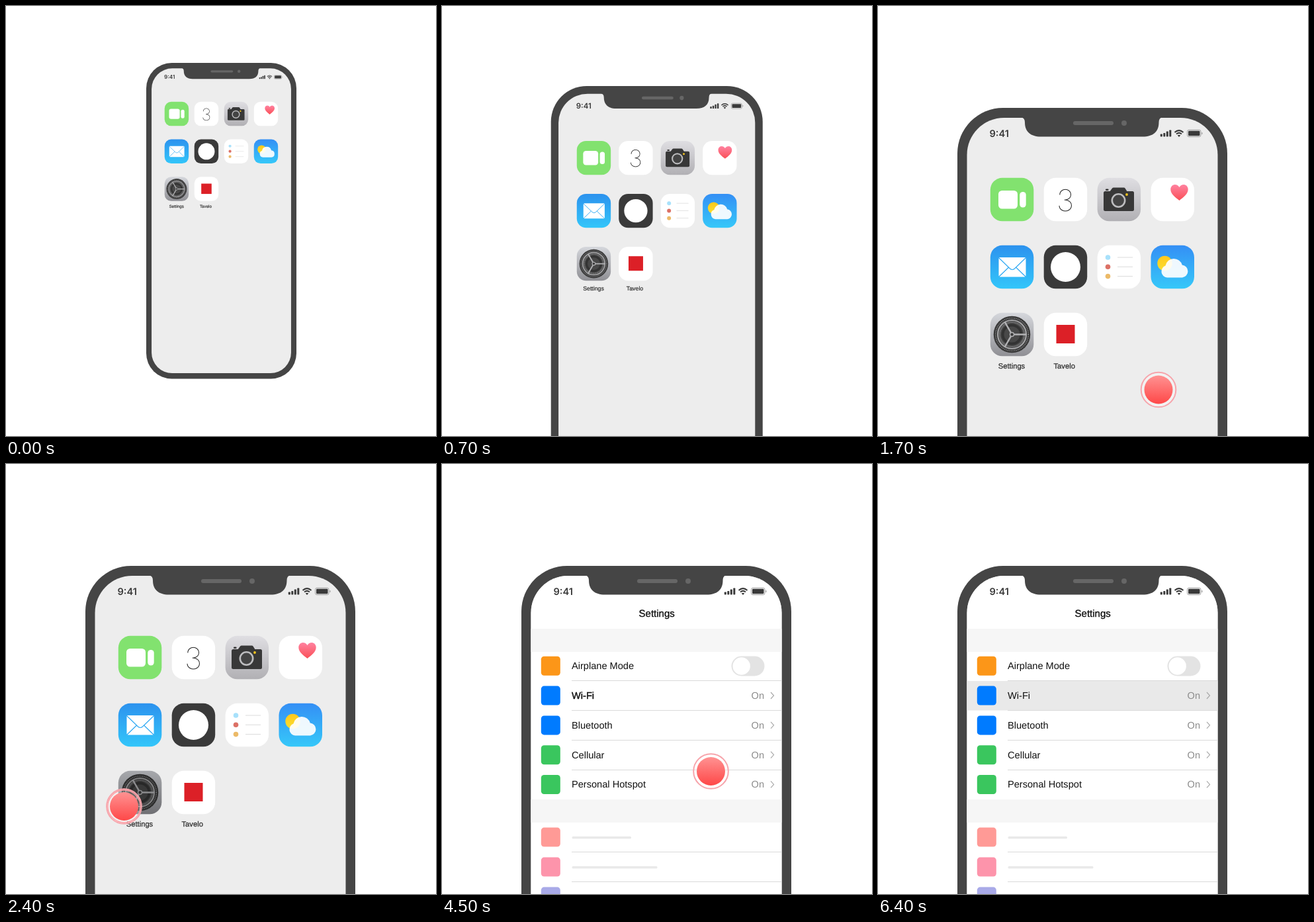
An HTML page that plays this animation: 650x650 px, repeating every 8000 ms.

```html
<!DOCTYPE html>
<html lang="en">
<head>
<meta charset="utf-8">
<title>Phone settings walkthrough</title>
<style>
html, body { margin: 0; width: 100%; height: 100%; overflow: hidden; background: #fff; }
svg { display: block; width: 100vw; height: 100vh; }
text { font-family: "Liberation Sans", Arial, sans-serif; text-rendering: geometricPrecision; }
.row { font-size: 14.6px; fill: #111; }
.on { font-size: 14.6px; fill: #8c8c8c; text-anchor: end; }
.label { font-size: 11.2px; fill: #333; stroke: #333; stroke-width: .3; text-anchor: middle; }
.title { font-size: 15px; fill: #111; stroke: #111; stroke-width: .35; text-anchor: middle; }
.clock { font: 600 14.6px Inter, sans-serif; fill: #3a3a3a; }
.three { font: 100 45px Inter, sans-serif; fill: #222; text-anchor: middle; }
</style>
</head>
<body>
<svg viewBox="0 0 650 650">
  <defs id="defs">
    <clipPath id="screen"><rect x="134.5" y="169" width="379" height="828" rx="56"/></clipPath>
  </defs>
  <g id="phone">
    <rect x="120" y="154" width="408" height="858" rx="69" fill="#454545"/>
    <g clip-path="url(#screen)">
      <rect x="134" y="168" width="380" height="830" fill="#ededed"/>
      <g id="home"></g>
      <g id="settings"></g>
    </g>
    <path fill="#454545" d="M216 168 Q222 169 222 176 C222 190 231 197.5 246 197.5 H400 C416 197.5 424.5 190 424.5 176 Q424.5 169 430 168Z"/>
    <rect x="295" y="174" width="61" height="6" rx="3" fill="#666"/>
    <circle cx="372" cy="177" r="4" fill="#666"/>
    <text class="clock" x="168.5" y="198">9:41</text>
    <g id="status" fill="#3a3a3a"></g>
  </g>
  <g id="touch">
    <circle id="ripple" fill="none" stroke="#ff8088" stroke-width="1.3"/>
    <circle id="ring" r="26.3" fill="#fff" fill-opacity=".25" stroke="#f7a4ab" stroke-width="2"/>
    <circle id="dot" r="21.5" fill="url(#red)"/>
  </g>
</svg>
<script>
const $ = id => document.getElementById(id);
const rect = (x, y, w, h, fill, r = 0) =>
  `<rect x="${x}" y="${y}" width="${w}" height="${h}" rx="${r}" fill="${fill}"/>`;
const circle = (x, y, r, fill, extra = "") =>
  `<circle cx="${x}" cy="${y}" r="${r}" fill="${fill}" ${extra}/>`;
const line = (d, stroke, width = 1, extra = "") =>
  `<path d="${d}" fill="none" stroke="${stroke}" stroke-width="${width}" ${extra}/>`;
const text = (x, y, cls, s, extra = "") =>
  `<text x="${x}" y="${y}" class="${cls}" ${extra}>${s}</text>`;

const gradients = {
  red: ["#ff9292", "#fe4848"],
  metal: ["#dfdee2", "#b1b0b4"],
  love: ["#ff82a0", "#fa4f56"],
  mail: ["#2c92ee", "#33c6fa"],
  sky: ["#348ff5", "#36c8f9"],
  sun: ["#ffc81c", "#fadf2f"],
  steel: ["#d5d7dc", "#8f8f94"]
};
for (const [id, [top, bottom]] of Object.entries(gradients))
  $("defs").innerHTML += `<linearGradient id="${id}" x2="0" y2="1">
    <stop stop-color="${top}"/><stop offset="1" stop-color="${bottom}"/></linearGradient>`;

// Home screen
const SIZE = 65.5;
const tile = (col, row, fill) => rect(169.8 + col * 80.9, 259.8 + row * 102, SIZE, SIZE, fill, 18);

function gear(x, y) {
  const spokes = [0, 120, 240].map(a => `<path d="M3 0H22" transform="rotate(${a})"/>`).join("");
  return `<g transform="translate(${x} ${y})">
    ${circle(0, 0, 27.8, "#383838")}
    ${circle(0, 0, 24.8, "none", 'stroke="#858587" stroke-width="1.6" stroke-dasharray="1.3 1.3"')}
    ${circle(0, 0, 21.5, "#4a4a4a", 'stroke="#a2a2a4" stroke-width="2.2"')}
    ${circle(0, 0, 18.5, "none", 'stroke="#8a8a8c" stroke-width="1.8" stroke-dasharray="1 1"')}
    ${circle(0, 0, 14, "#484848", 'stroke="#333" stroke-width="4"')}
    <g stroke="#b2b2b4" stroke-width="2.4">${spokes}</g>
    ${circle(0, 0, 3, "#3a3a3a", 'stroke="#b2b2b4" stroke-width="1.4"')}
  </g>`;
}

const reminders = ["#a8e1fb", "#dc7166", "#ecba68"].map((color, i) => {
  const y = 380 + i * 14.3;
  return circle(347.5, y, 3.8, color) + line(`M362 ${y}H385`, "#dedede", 1.1);
}).join("");

$("home").innerHTML = [
  tile(0, 0, "#82e26f"),
  rect(182, 279, 29, 27.5, "#fff", 5.5), rect(214.3, 281, 9.4, 23.5, "#fff", 4.5),
  tile(1, 0, "#fff"), text(283, 309.6, "three", "3"),
  tile(2, 0, "url(#metal)"),
  rect(341, 280, 46, 30, "#383838", 2.5), rect(344, 276.4, 4.5, 2.6, "#383838", 1),
  '<path d="M350 281L354 275.5Q355 274.5 356 274.5H371.5Q373 274.5 373.5 275.5L377 281Z" fill="#383838"/>',
  circle(363.5, 294, 9.7, "#444", 'stroke="#bdbdbf" stroke-width="2.6"'),
  circle(376, 285, 1.9, "#f6c51d"),
  tile(3, 0, "#fff"),
  '<path d="M455.5 294C449 289 442.3 284 442.3 277.3C442.3 269.5 452 267.5 455.5 274C459 267.5 468.7 269.5 468.7 277.3C468.7 284 462 289 455.5 294Z" fill="url(#love)"/>',
  tile(0, 1, "url(#mail)"),
  rect(182.5, 380, 41, 29.5, "#fff", 2),
  line("M183 381L199.5 397Q203 400 206.500 397L223 381M183 409L197.500 395M223 409L208.500 395", "#2fa9f3", 1.2),
  tile(1, 1, "#3a3a3a"), circle(283.5, 394.5, 22.5, "#fff"),
  tile(2, 1, "#fff"), reminders,
  tile(3, 1, "url(#sky)"),
  circle(433.5, 389, 11.2, "url(#sun)"),
  '<path d="M437 410.500A9.300 9.300 0 0 1 434.500 392.500A13 13 0 0 1 459.800 391.600A9.500 9.500 0 0 1 460 410.500Z" fill="#fff" fill-opacity=".92"/>',
  tile(0, 2, "url(#steel)"), gear(202.5, 496.5),
  `<g id="pressed">${tile(0, 2, "#000")}</g>`,
  tile(1, 2, "#fff"), rect(269.5, 482, 28, 28, "#dc2027"),
  text(202, 548, "label", "Settings"), text(281.7, 548, "label", "Tavelo")
].join("");

// Settings screen
const rows = [
  ["Airplane Mode", "#fc9618"], ["Wi-Fi", "#007bff"], ["Bluetooth", "#007bff"],
  ["Cellular", "#3ac65e"], ["Personal Hotspot", "#3ac65e"]
];
const square = (y, color) => rect(149.8, y - 14.4, 29, 29, color, 4.5);
const separator = y => line(`M196 ${y}H514`, "#dadada");

$("settings").innerHTML = [
  rect(134, 168, 380, 830, "#fff"),
  rect(134, 249, 380, 35, "#f6f6f6"), rect(134, 507, 380, 35, "#f6f6f6"),
  text(324.7, 231, "title", "Settings"),
  `<g id="selected">${rect(134, 328, 380, 44.5, "#e9e9e9")}</g>`,
  ...rows.map(([name, color], i) => {
    const y = 305.2 + i * 44.8;
    const value = i ? text(487, y + 5, "on", "On") + line(`M497 ${y - 5}L501.500 ${y}L497 ${y + 5}`, "#aaa", 1.2) : "";
    return square(y, color) + text(196, y + 5, "row", name, i === 1 ? 'id="wifi" stroke="#111"' : "")
      + value + (i < 4 ? separator(327.5 + i * 45) : "");
  }),
  rect(437.5, 290.5, 50, 30, "#e3e3e3", 15), circle(452.7, 305.5, 13.2, "#fff"),
  ...["#ff9a96", "#fd94ab", "#a9aae8"].map((color, i) => square(564 + i * 45, color)),
  rect(196.5, 563, 89.5, 3.4, "#e9e9e9", 1.5), rect(196.5, 608, 129, 3.4, "#e9e9e9", 1.5),
  separator(586.5), separator(631.5)
].join("");

// Status bar
$("status").innerHTML = [
  ...[4, 5.5, 8, 10].map((h, i) => rect(426.8 + i * 4.5, 197.5 - h, 3, h, "#3a3a3a", .7)),
  line("M448.500 191Q455 185.300 461.500 191M451 193.600Q455 190.200 459 193.600", "#3a3a3a", 2),
  '<path d="M455 198L452.700 195.600Q455 193.800 457.300 195.600Z"/>',
  rect(467.5, 187.3, 20.5, 10.4, "none", 2.5).replace("/>", ' stroke="#a0a0a0"/>'),
  rect(469, 188.8, 17.5, 7.4, "#3a3a3a", 1.3), rect(489.3, 191, 1.2, 3, "#a0a0a0", .6)
].join("");

// Motion
const LOOP = 8000, STEP = 100;
const ramp = (t, from, to) => Math.min(1, Math.max(0, (t - from) / (to - from)));
const ease = p => p * p * (3 - 2 * p);
const mix = (a, b, p) => a + (b - a) * p;

const taps = [
  { show: 1500, move: 1800, land: 2300, press: 2400, hide: 3000, from: [424, 580], to: [178.5, 517.5] },
  { show: 4200, move: 4500, land: 5300, press: 5500, hide: 6300, from: [406.5, 464.5], to: [185, 352] }
];

function zoom(t) {
  const n = t / 100;
  const p = Math.min(1, .0597 * n + .00196 * n * n);
  const scale = mix(.5564, 1, p);
  $("phone").setAttribute("transform",
    `translate(${mix(212, 120, p)} ${mix(86, 154, p)}) scale(${scale}) translate(-120 -154)`);
}

function touch(t) {
  const tap = taps.find(a => t > a.show && t < a.hide + STEP);
  $("touch").setAttribute("visibility", tap ? "visible" : "hidden");
  if (!tap) return;
  const p = ease(ramp(t, tap.move, tap.land));
  const [x, y] = tap.from.map((v, i) => mix(v, tap.to[i], p));
  const spread = ramp(t, tap.press, tap.hide);
  const fade = ramp(t, tap.show, tap.show + 200) * (1 - ramp(t, tap.hide - 300, tap.hide));
  $("touch").setAttribute("transform", `translate(${x} ${y})`);
  $("touch").setAttribute("opacity", fade);
  $("ripple").setAttribute("r", mix(24.5, 41, spread));
  $("ripple").setAttribute("opacity", t >= tap.press ? 1 - spread : 0);
}

function draw(t) {
  zoom(t);
  touch(t);
  $("pressed").setAttribute("opacity", .22 * ramp(t, 2200, 2400));
  $("settings").setAttribute("opacity", ramp(t, 3400, 4000));
  const chosen = ramp(t, 5500, 5900);
  $("selected").setAttribute("opacity", chosen);
  $("wifi").setAttribute("stroke-width", .4 * (1 - chosen));
}

const start = performance.now();
function tick(now) {
  const t = Math.max(0, now - start) % LOOP;
  draw(Math.floor(t / STEP) * STEP);
  requestAnimationFrame(tick);
}
draw(0);
requestAnimationFrame(tick);
</script>
</body>
</html>
```
